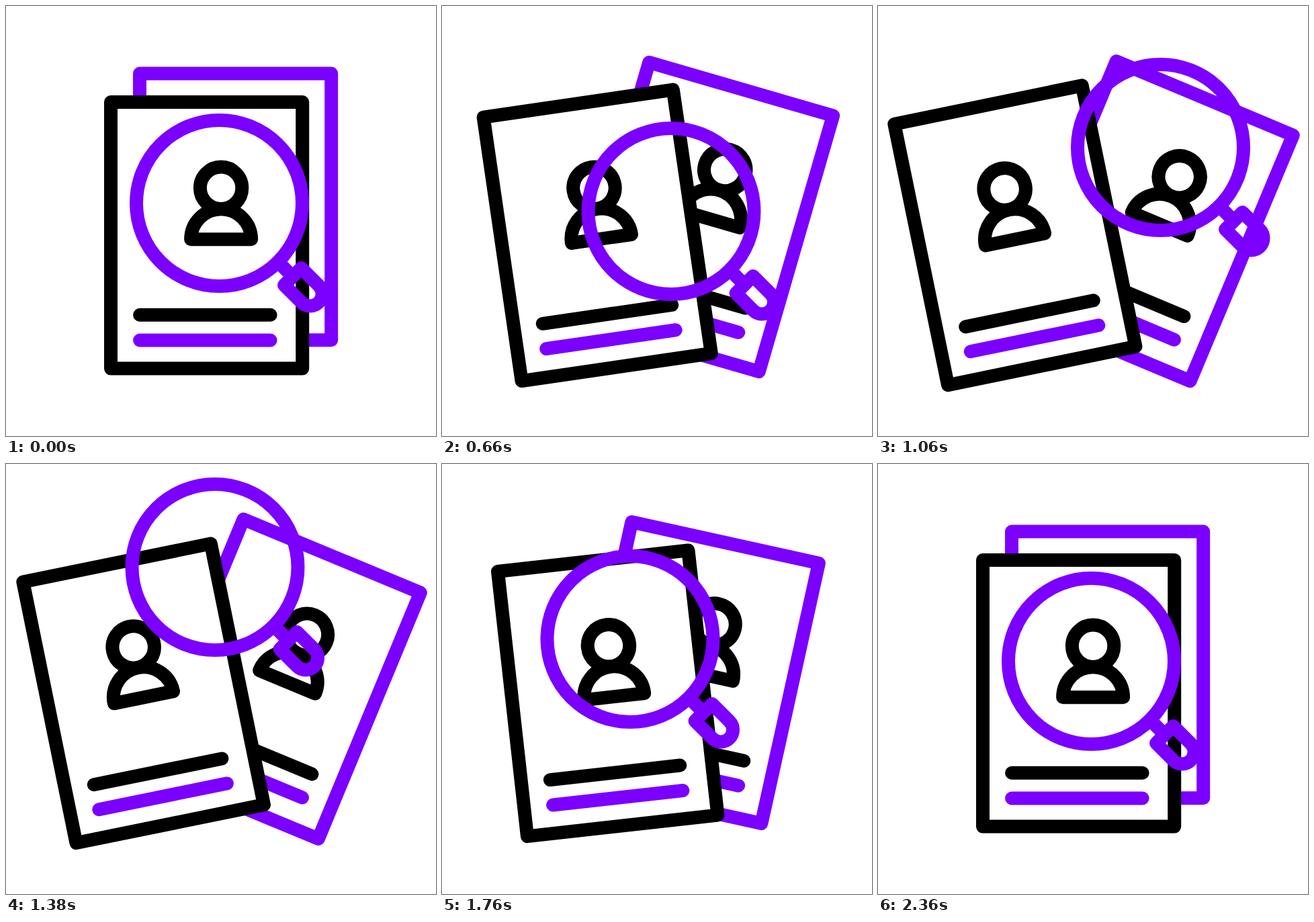
Write an HTML page that moves like this. It is 640 px wide and 640 px high and loops after 2.4 s.

```html
<!DOCTYPE html>
<html lang="en">
<head>
<meta charset="utf-8">
<title>Profile search</title>
<style>
  html, body { margin: 0; width: 100%; height: 100%; overflow: hidden; background: #fff; }
  svg { display: block; width: 100vw; height: 100vh; }
  .ink { stroke: #000; }
  .hue { stroke: #7b00ff; }
</style>
</head>
<body>
<svg viewBox="0 0 640 640" fill="none" stroke-width="20" stroke-linecap="round" stroke-linejoin="round">
  <defs>
    <rect id="sheet" x="-142.6" y="-198.3" width="285.2" height="396.6" fill="#fff"/>
    <g id="person" class="ink">
      <circle r="31.2"/>
      <path d="M-45 76.5H45A45 45 0 0 0 -45 76.5Z"/>
    </g>
    <g id="lines">
      <path class="ink" d="M-99.5 118.5H95"/>
      <path class="hue" d="M-99.5 156.2H95"/>
    </g>
  </defs>
  <g id="back">
    <use href="#sheet" class="hue"/>
    <use href="#person" x="10.5" y="-76"/>
    <use href="#lines" x="2" y="-5.5"/>
  </g>
  <g id="front">
    <use href="#sheet" class="ink"/>
    <use href="#person" id="face"/>
    <use href="#lines"/>
  </g>
  <g id="lens" class="hue">
    <circle r="123.5"/>
    <g transform="rotate(45)">
      <path d="M124 0H154.5" stroke-linecap="butt"/>
      <path d="M154.5 -18H191A18 18 0 0 1 191 18H154.5Z"/>
    </g>
  </g>
</svg>
<script>
const LOOP = 2400, OPEN_END = 1200, CLOSE_END = 2340;
const [back, front, face, lens] = ['back', 'front', 'face', 'lens'].map(id => document.getElementById(id));

// Lens path: time, position, velocity in px per ms
const path = [
  [400, 317.5, 293.5, 0, 0],
  [660, 341, 305.5, 0.22, 0],
  [1060, 420.5, 210.5, -0.1, -0.33],
  [1380, 311, 153.5, -0.28, 0],
  [1760, 280, 260.5, 0.06, 0.22],
  [2150, 317.5, 293.5, 0, 0]
];

// Cubic bezier (0.8, 0, 0.2, 1), solved by bisection
function ease(x) {
  let lo = 0, hi = 1;
  for (let i = 0; i < 30; i++) {
    const s = (lo + hi) / 2, r = 1 - s;
    if (2.4 * r * r * s + 0.6 * r * s * s + s * s * s < x) lo = s;
    else hi = s;
  }
  return lo * lo * (3 - 2 * lo);
}

function spread(t) {
  if (t < OPEN_END) return ease(t / OPEN_END);
  if (t < CLOSE_END) return 1 - ease((t - OPEN_END) / (CLOSE_END - OPEN_END));
  return 0;
}

function hermite(a, va, b, vb, s) {
  const q = s * s, c = q * s;
  return a * (2 * c - 3 * q + 1) + va * (c - 2 * q + s) + b * (3 * q - 2 * c) + vb * (c - q);
}

function lensAt(t) {
  const i = path.findIndex(k => t < k[0]);
  if (i < 1) return [317.5, 293.5];
  const a = path[i - 1], b = path[i], d = b[0] - a[0], s = (t - a[0]) / d;
  return [1, 2].map(n => hermite(a[n], a[n + 2] * d, b[n], b[n + 2] * d, s));
}

function place(el, x, y, turn = 0) {
  el.setAttribute('transform', `translate(${x.toFixed(3)} ${y.toFixed(3)}) rotate(${turn.toFixed(3)})`);
}

function draw(t) {
  const p = spread(t);
  place(back, 341.6 + 68.6 * p, 298.9 + 21.5 * p, 22.9 * p);
  place(front, 298.6 - 95.5 * p, 341.3, -11.7 * p);
  place(face, 21.5 - 22.8 * p, -70.5);
  place(lens, ...lensAt(t));
}

let start;
function tick(now) {
  start ??= now;
  draw(Math.max(0, now - start) % LOOP);
  requestAnimationFrame(tick);
}
draw(0);
requestAnimationFrame(tick);
</script>
</body>
</html>
```
